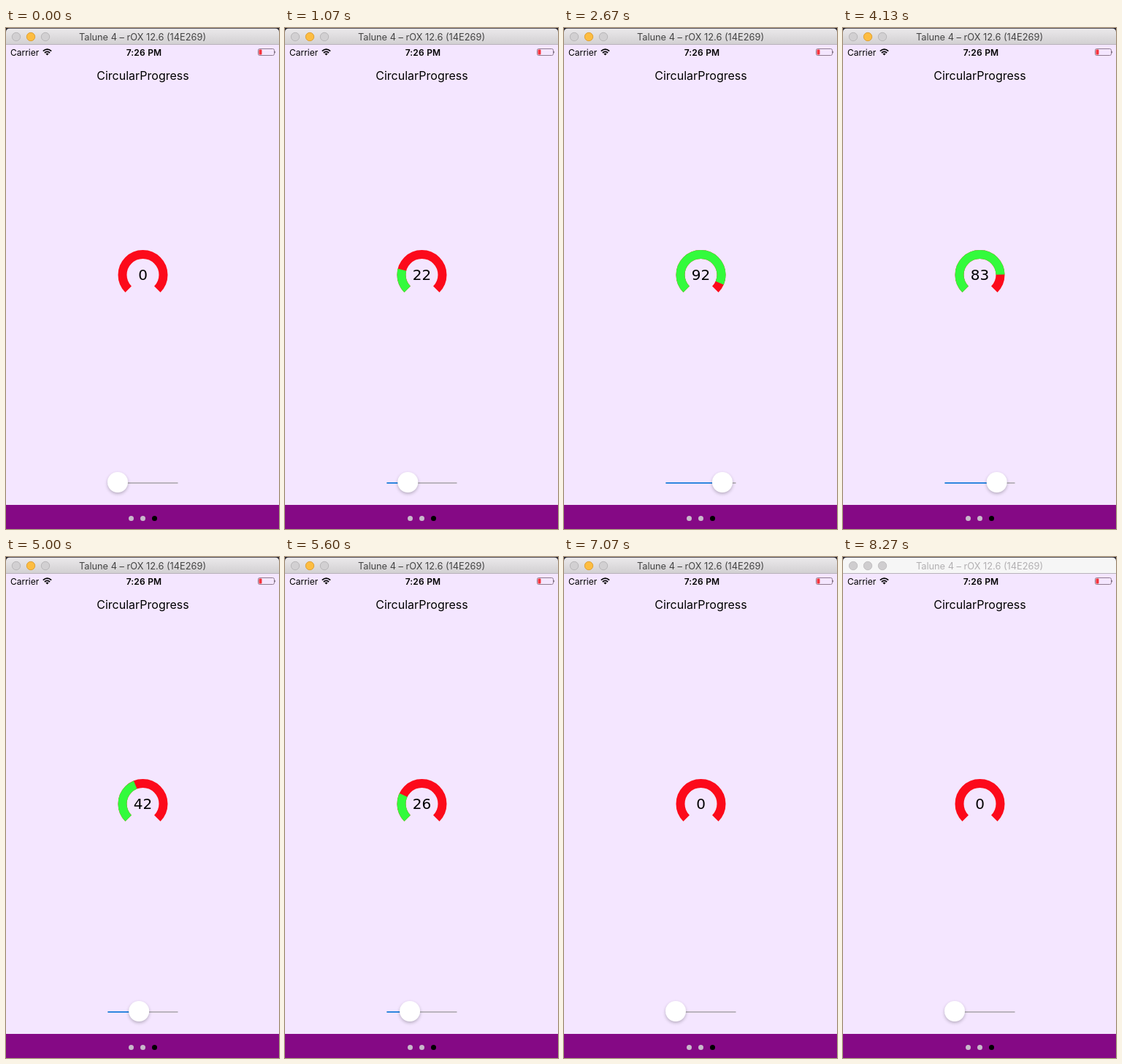
Animation of 374 by 686 pixels, one loop 8340 ms. Source, as an HTML page:

```html
<!DOCTYPE html>
<html lang="en">
<head>
<meta charset="utf-8">
<title>CircularProgress</title>
<style>
  html, body { margin: 0; width: 100%; height: 100%; overflow: hidden; background: #f4e6ff; }
  svg { display: block; width: 374px; height: 686px; }
  text { font-family: Inter, Roboto, sans-serif; fill: #000; }
  .caption { font-size: 12.8px; fill: #444; }
  .light { fill: #d2d0d2; stroke: #b9b7b9; }
  .light.yellow { fill: #fdbd41; stroke: #dfa136; }
  .inactive .bar { fill: #f6f6f6; }
  .inactive .caption { fill: #b2b0b2; }
  .inactive .light { fill: #cfcdcf; stroke: #c2c0c2; }
  .ring { fill: none; stroke-width: 12; }
  #count { font: 20px "DejaVu Sans", sans-serif; }
  #thumb { filter: drop-shadow(0 2px 2px rgba(0, 0, 0, .24)); }
</style>
</head>
<body>
<svg viewBox="0 0 374 686">
  <defs>
    <linearGradient id="chrome" x2="0" y2="1">
      <stop stop-color="#ebe9eb"/>
      <stop offset="1" stop-color="#d1cfd1"/>
    </linearGradient>
  </defs>
  <rect width="374" height="686" fill="#f4e6ff"/>

  <g id="window">
    <rect width="374" height="8" fill="#25222c"/>
    <path class="bar" d="M0 23V5.5Q0 .7 5 .7H369Q374 .7 374 5.5V23Z" fill="url(#chrome)"/>
    <path d="M0 22.5H374" stroke="#b8b2bb"/>
    <circle class="light" cx="14" cy="12" r="5.7"/>
    <circle class="light yellow" cx="34" cy="12" r="5.7"/>
    <circle class="light" cx="54" cy="12" r="5.7"/>
    <text class="caption" x="187" y="17" text-anchor="middle">Talune 4 – rOX 12.6 (14E269)</text>
  </g>

  <g font-size="12">
    <text x="6" y="38">Carrier</text>
    <text x="189" y="38" text-anchor="middle" font-weight="600" letter-spacing=".2">7:26 PM</text>
  </g>
  <g fill="none" stroke="#000" stroke-width="1.7">
    <path d="M50.8 31.6Q56.5 26.6 62.2 31.6M52.9 34Q56.5 30.7 60.1 34"/>
    <path d="M54.4 35.3Q56.5 33.6 58.6 35.3L56.5 37.6Z" fill="#000" stroke="none"/>
  </g>
  <rect x="345.5" y="28.5" width="22" height="9" rx="2" fill="none" stroke="#8f7b90"/>
  <rect x="346.5" y="29.5" width="4" height="7" rx="1" fill="#f5333c"/>
  <path d="M368.4 31.2Q370 33 368.4 34.9Z" fill="#3b333d"/>

  <text x="187.5" y="71" text-anchor="middle" font-size="16">CircularProgress</text>

  <path id="ring" class="ring" stroke="#fc0a1a"/>
  <path id="fill" class="ring" stroke="#33fb3c" pathLength="100"/>
  <text id="count" x="187.5" y="345" text-anchor="middle">0</text>

  <path d="M139.5 623H235.5" stroke="#bab4be" stroke-width="2"/>
  <path id="track" stroke="#2f87df" stroke-width="2"/>
  <circle id="thumb" cx="153" cy="622" r="14" fill="#fff"/>

  <rect y="653" width="374" height="33" fill="#850985"/>
  <g fill="#c9b9cb">
    <circle cx="171.5" cy="671.5" r="3.5"/>
    <circle cx="187.5" cy="671.5" r="3.5"/>
    <circle cx="203.5" cy="671.5" r="3.5" fill="#000"/>
  </g>
</svg>
<script>
  const LOOP = 8340, STEP = 1000 / 15, BLUR_AT = 8130;
  // Drag path: time, value, speed per ms
  const drag = [
    [0, 0, 0], [280, 0, 0], [1870, 61, .039], [2670, 92, .036], [3000, 100, 0],
    [3650, 100, 0], [4130, 83, -.047], [5000, 42, -.047], [5480, 22, 0],
    [6080, 62, 0], [6200, 59, -.05], [6930, 6, -.05], [7100, 0, 0], [LOOP, 0, 0]
  ];
  const el = id => document.getElementById(id);

  // Cubic Hermite interpolation
  function valueAt(t) {
    const i = drag.findIndex(p => p[0] > t);
    const [t0, v0, s0] = drag[i - 1], [t1, v1, s1] = drag[i];
    const d = t1 - t0, u = (t - t0) / d, w = 1 - u;
    const v = w * w * (1 + 2 * u) * v0 + u * u * (3 - 2 * u) * v1
            + d * u * w * (w * s0 - u * s1);
    return Math.round(Math.min(100, Math.max(0, v)));
  }

  function draw(now) {
    const t = Math.floor((now % LOOP + 4) / STEP) * STEP % LOOP;
    const v = valueAt(t), x = 153 + v * .695;
    el('count').textContent = v;
    el('fill').style.display = v ? '' : 'none';
    el('fill').setAttribute('stroke-dasharray', `${v} 200`);
    el('thumb').setAttribute('cx', x);
    el('track').setAttribute('d', `M139.5 623H${x}`);
    el('window').classList.toggle('inactive', t >= BLUR_AT);
  }

  const r = 28, k = r * Math.SQRT1_2;
  const arc = `M${187.5 - k} ${338 + k}A${r} ${r} 0 1 1 ${187.5 + k} ${338 + k}`;
  for (const id of ['ring', 'fill']) el(id).setAttribute('d', arc);

  const start = performance.now();
  function tick() {
    draw(performance.now() - start);
    requestAnimationFrame(tick);
  }
  tick();
</script>
</body>
</html>
```
